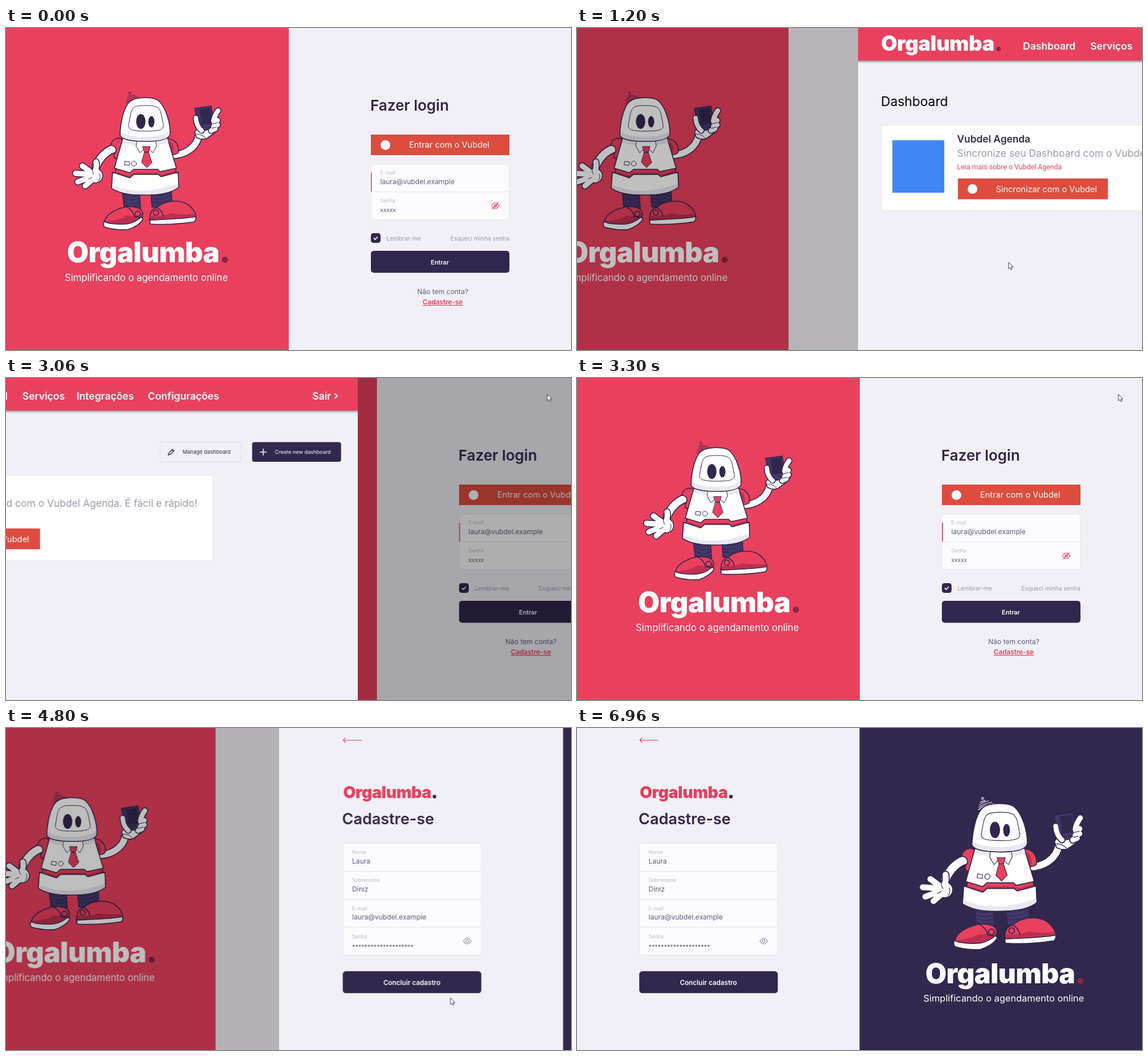
Recreate the animation shown at these times as an HTML page. Size 991 by 565 pixels, loop 7.32 s.

```html
<!DOCTYPE html>
<html lang="pt">
<head>
<meta charset="utf-8">
<title>Login</title>
<style>
  html, body { margin: 0; width: 100%; height: 100%; overflow: hidden; background: #f2f0f7; }
  svg { display: block; width: 100vw; height: 100vh; font-family: Inter, "Open Sans", sans-serif; }
  :root { --red: #e9405e; --ink: #32274d; --dot: #8c2443; }

  .red { fill: var(--red); }
  .ink { fill: var(--ink); }
  .page { fill: #f2f0f7; }
  .white { fill: #fff; }
  .sso { fill: #dc4d40; }
  .field { fill: #fcfbfd; stroke: #e6e4ed; }
  .rule { stroke: #e6e4ed; }
  .label { fill: #bdb8c9; font-size: 8.9px; }
  .value { fill: #645b7c; font-size: 12.1px; }
  .note { fill: #9d97ab; font-size: 10.35px; }
  .semi { font-weight: 600; }
  .mid { text-anchor: middle; }
  .nav { fill: #fff; font-size: 17.5px; font-weight: 600; }
  .icon { fill: none; stroke-width: 1.1; stroke-linecap: round; stroke-linejoin: round; }
  .brand { font-size: 49px; font-weight: 900; letter-spacing: -.6px; fill: currentColor; }

  .robot { stroke: var(--ink); stroke-width: 1.6; stroke-linejoin: round; stroke-linecap: round; }
  .robot .line { fill: none; }
  .robot .thin { stroke-width: 1; }
  .robot .flat { stroke: none; }
  .robot .shade { stroke: none; fill: #e9e7f0; }
  .robot .dark { stroke: none; fill: #bd2f50; }
  .robot .limb { fill: none; stroke: #fff; }
  .robot .edge { fill: none; }

  .login, .dash, .signup, .shade-over, .cursor { animation: 7320ms linear infinite; }
  .login { animation-name: login; }
  .dash { animation-name: dash; }
  .signup { animation-name: signup; }
  .shade-over { animation-name: dim; }
  .cursor { animation-name: cursor; }

  @keyframes login {
    0%, 100% { transform: none; }
    14.996% { transform: none; animation-timing-function: ease-out; }
    19.094%, 40.791% { transform: translateX(-248.75px); }
    40.792% { transform: translateX(248.75px); animation-timing-function: ease-out; }
    44.891% { transform: none; }
    64.131% { transform: none; animation-timing-function: ease-out; }
    68.23%, 99.999% { transform: translateX(-248.75px); }
  }
  @keyframes dim {
    0%, 100% { opacity: 0; }
    14.996% { opacity: 0; animation-timing-function: ease-out; }
    19.094% { opacity: .5; }
    40.792% { opacity: .5; animation-timing-function: ease-out; }
    44.891% { opacity: 0; }
    64.131% { opacity: 0; animation-timing-function: ease-out; }
    68.23%, 99.999% { opacity: .5; }
  }
  @keyframes dash {
    0% { transform: translateX(995px); }
    14.996% { transform: translateX(995px); animation-timing-function: ease-out; }
    19.094% { transform: none; }
    40.792% { transform: none; animation-timing-function: ease-out; }
    44.891%, 100% { transform: translateX(-995px); }
  }
  @keyframes signup {
    0% { transform: translateX(995px); }
    64.131% { transform: translateX(995px); animation-timing-function: ease-out; }
    68.23%, 100% { transform: none; }
  }
  @keyframes cursor {
    0%, 2.46% { transform: translate(1000px, 80px); }
    3.279% { transform: translate(985px, 87px); animation-timing-function: ease-in-out; }
    13.115%, 14.75% { transform: translate(753px, 411px); }
    15.574%, 19.672% { transform: translate(757px, 411px); animation-timing-function: ease-in; }
    25.41% { transform: translate(878px, 384px); }
    31.148% { transform: translate(930px, 190px); animation-timing-function: ease-out; }
    36.066% { transform: translate(952px, 45px); }
    36.885% { transform: translate(946px, 36px); }
    38.525%, 45.902% { transform: translate(949.5px, 28.5px); animation-timing-function: ease-in; }
    50.82% { transform: translate(937px, 216px); animation-timing-function: ease-out; }
    61.475% { transform: translate(773px, 473.5px); }
    63.934%, 66% { transform: translate(779.5px, 473.5px); animation-timing-function: ease-in-out; }
    70.492% { transform: translate(896.5px, 443.5px); }
    72.131% { transform: translate(901px, 437px); }
    76.23%, 82.787% { transform: translate(900.5px, 425px); }
    84.426%, 86.066% { transform: translate(900.5px, 418px); animation-timing-function: ease-in-out; }
    95.082%, 100% { transform: translate(1000px, 45px); }
  }
</style>
</head>
<body>
<svg viewBox="0 0 991 565">
  <defs>
    <linearGradient id="drop" x2="0" y2="1">
      <stop stop-opacity=".38"/>
      <stop offset="1" stop-opacity="0"/>
    </linearGradient>

    <g id="brand">
      <text x="-1" class="brand">Orgalumba</text>
      <circle cx="276" cy="-4.5" r="5.4" fill="var(--dot)"/>
    </g>

    <path id="armLeft" d="M195 210C178 213 164 227 158 243"/>
    <path id="armRight" d="M288 223C312 224 334 211 338 188"/>
    <path id="fingersLeft" d="M153 256L134 242M152 257L122 255M153 260L126 270M154 264L139 277M154 254Q160 248 158 235M156 258L162 263"/>
    <path id="thumbRight" d="M343 180Q334 172 333 158"/>
    <path id="fingersRight" d="M364 163Q366 153 372 145M365 166L371 162M364 173L371 170M360 180L367 177"/>
    <path id="shoeLeft" d="M173 340C175 327 190 319 209 314C225 312 240 316 240 326C239 334 222 343 210 344C195 345 178 343 173 340Z"/>
    <path id="shoeRight" d="M253 337C251 325 256 317 265 315C277 303 302 300 318 309C328 316 333 325 333 331C315 335 272 336 253 337Z"/>

    <g id="robot" class="robot">
      <g class="line thin" style="stroke: currentColor">
        <circle cx="217" cy="114" r="1.6"/>
        <path d="M213 120L221 117M212 124Q219 119 226 118M211 128Q219 122 231 120M210 132Q220 124 235 122"/>
      </g>

      <path d="M204 284L207 313Q220 321 236 316L234 286ZM254 286L256 314Q274 319 291 306L290 280Z" fill="#43386a"/>
      <path class="line thin" d="M204 292Q220 299 235 293M205 298Q220 305 235 299M206 304Q220 311 236 305M207 310Q220 317 236 311M254 293Q273 298 290 287M255 299Q273 304 290 293M256 305Q273 310 291 299"/>

      <path class="white" d="M172 339C170 345 171 349 175 350Q194 355 213 354C226 350 238 342 240 335L238 326Z"/>
      <path class="white" d="M252 335L253 344Q293 346 330 340Q334 337 333 330Z"/>
      <use href="#shoeLeft" class="red"/>
      <path class="dark" d="M174 339Q200 337 211 329Q226 332 239 324C239 334 222 342 210 343Q186 344 174 339Z"/>
      <use href="#shoeRight" class="red"/>
      <path class="dark" d="M254 330Q278 331 290 325Q312 329 332 326V330Q304 334 254 336Z"/>
      <path class="line" d="M212 314Q224 321 225 331L239 333M265 315Q274 320 276 330"/>
      <circle cx="231" cy="326" r="4.6" class="red"/>
      <circle cx="263" cy="324" r="4.6" class="red"/>

      <use href="#armLeft" class="edge" stroke-width="16"/>
      <use href="#armLeft" class="limb" stroke-width="12.8"/>
      <use href="#armRight" class="edge" stroke-width="14"/>
      <use href="#armRight" class="limb" stroke-width="10.8"/>

      <path class="red" d="M184 206C185 194 199 190 205 197C210 210 206 227 196 229C189 230 187 224 192 218C195 211 190 206 184 206Z"/>
      <path class="red" d="M283 194C297 195 305 206 302 219Q297 223 292 222Z"/>
      <path class="dark" d="M200 199Q206 213 195 226Q204 226 206 213ZM287 198Q297 207 294 220L289 215Z"/>

      <path class="red" d="M193 246L297 242L299 262L260 269H226L191 261Z"/>
      <path class="dark" d="M195 253L217 260L224 254H267L271 258L297 250V262H195Z"/>
      <path class="white" d="M187 253L217 263L224 257H267L272 261L302 253L303 279C292 289 270 293 245 293C220 294 198 290 185 281Z"/>
      <path class="shade" d="M186 275Q235 297 302 273V279Q283 292 245 292Q207 293 186 281Z"/>

      <path class="white" d="M205 193L190 246L217 254L224 248H266L270 252L299 246L283 193Z"/>
      <path class="shade" d="M207 194Q246 209 283 194L285 201Q246 213 205 201Z"/>
      <path class="white thin" d="M230 196L228 207L235 219L246 208L258 219L264 207L262 196Z"/>
      <path class="red thin" d="M240 208H253L250 218H243ZM243 218H250L256 236L247 245L238 236Z"/>
      <path class="line thin" d="M209 234L217 235L216 241L208 240Z"/>
      <circle class="line thin" cx="224.5" cy="238" r="4.3"/>

      <path class="white" d="M200 187C201 165 206 141 216 130C226 120 259 120 268 128C280 139 288 165 288 185C287 194 273 199 246 199C219 199 201 195 200 187Z"/>
      <path class="shade" d="M201 181Q211 191 246 191Q280 190 287 179V185Q284 198 246 198Q205 198 201 187Z"/>
      <path class="white thin" d="M219 149C222 138 227 136 245 136C264 136 269 139 272 150L276 170C277 178 271 181 245 181C220 181 214 178 215 170Z"/>
      <ellipse class="ink flat" cx="236.5" cy="164" rx="8.2" ry="13"/>
      <ellipse class="ink flat" cx="255" cy="164.5" rx="5.4" ry="10"/>

      <use href="#fingersLeft" class="edge" stroke-width="12.5"/>
      <circle cx="157" cy="259" r="12.5" class="white"/>
      <use href="#fingersLeft" class="limb" stroke-width="9.3"/>
      <circle cx="157" cy="259" r="11.5" class="white flat"/>
      <path class="line thin" d="M152 244Q150 252 154 257M145 265L151 262M164 256Q167 263 162 268"/>

      <path class="white" d="M331 182L334 192Q343 197 352 194L366 184L360 168L340 172Z"/>
      <use href="#fingersRight" class="edge" stroke-width="11.5"/>
      <path d="M331 141L360 137L366 177L339 181Z" fill="#43386a"/>
      <path class="ink flat" d="M339 143L358 140L362 167L343 170Z"/>
      <path class="line thin" d="M344 175L350 174M353 174L360 173"/>
      <use href="#thumbRight" class="edge" stroke-width="11"/>
      <use href="#thumbRight" class="limb" stroke-width="7.8"/>
      <use href="#fingersRight" class="limb" stroke-width="8.3"/>
      <path class="line thin" d="M362 168L371 166M361 176L369 174M334 186Q344 186 351 194"/>
    </g>
  </defs>

  <g class="login">
    <rect x="-2" width="995" height="565" class="page"/>
    <rect x="-2" width="498" height="565" class="red"/>
    <use href="#robot" color="#32274d"/>
    <use href="#brand" transform="translate(108 411)" color="#fff"/>
    <text x="103" y="444" class="white" font-size="16.65">Simplificando o agendamento online</text>

    <text x="639" y="145" class="ink semi" font-size="26">Fazer login</text>
    <rect x="640" y="187" width="243" height="36" class="sso"/>
    <circle cx="665.5" cy="205.5" r="8.5" class="white"/>
    <text x="707" y="210" class="white" font-size="14.6">Entrar com o Vubdel</text>

    <rect x="640.5" y="238.5" width="242.5" height="98" rx="6" class="field"/>
    <path class="rule" d="M641 287.5H883"/>
    <rect x="640" y="254" width="1.6" height="33" class="red"/>
    <text x="656.5" y="257" class="label">E-mail</text>
    <text x="656.5" y="274" class="value">laura@vubdel.example</text>
    <text x="656.5" y="306" class="label">Senha</text>
    <text x="656.5" y="323" class="value" style="font-size: 10px">xxxxx</text>
    <g class="icon" stroke="#e9405e">
      <path d="M851.5 312Q858 302 865 312Q858 322 851.5 312ZM853 317.5L863.5 306.5"/>
      <circle cx="858.2" cy="312" r="2.2"/>
    </g>

    <rect x="640" y="360" width="17" height="17" rx="4.5" class="ink"/>
    <path class="icon" style="stroke-width: 1.7" stroke="#fff" d="M645.5 369L647.7 371L651.5 366.8"/>
    <text x="667.5" y="372.5" class="note">Lembrar-me</text>
    <text x="883" y="372.5" class="note" text-anchor="end">Esqueci minha senha</text>
    <rect x="640" y="391" width="243" height="38.5" rx="5" class="ink"/>
    <text x="761" y="414.5" class="white semi mid" font-size="10.9">Entrar</text>
    <text x="766" y="467" class="value mid">Não tem conta?</text>
    <text x="766" y="485" class="red semi mid" font-size="11.8" text-decoration="underline">Cadastre-se</text>
  </g>
  <rect class="shade-over" x="-2" width="995" height="565"/>

  <g class="dash">
    <rect x="-2" width="995" height="565" class="page"/>
    <rect x="-2" y="57" width="995" height="5" fill="url(#drop)"/>
    <rect x="-2" width="995" height="57" class="red"/>
    <use href="#brand" transform="translate(39 40) scale(.743)" color="#fff"/>
    <g class="nav">
      <text x="287" y="37.5">Dashboard</text>
      <text x="405" y="37.5">Serviços</text>
      <text x="500" y="37.5">Integrações</text>
      <text x="625" y="37.5">Configurações</text>
      <text x="913.5" y="37.5">Sair</text>
    </g>
    <path class="icon" style="stroke-width: 2" stroke="#fff" d="M953 27.5L957.5 31.5L953 35.5"/>

    <text x="38" y="137" font-size="22.8">Dashboard</text>
    <rect x="646.5" y="112.5" width="141" height="34.5" rx="4" fill="none" stroke="#dedbe8"/>
    <path class="icon" style="stroke-width: 1.4" stroke="#32274d" d="M661 135L662 131.5L668.5 125L671 127.5L664.5 134ZM667 126.5L669.5 129"/>
    <text x="686" y="133" class="ink" font-size="9.2">Manage dashboard</text>
    <rect x="808" y="112.5" width="156" height="34.5" rx="4" class="ink"/>
    <path class="icon" style="stroke-width: 1.6" stroke="#fff" d="M822 130H833M827.5 124.5V135.5"/>
    <text x="848" y="133" class="white" font-size="9.15">Create new dashboard</text>

    <rect x="39" y="170.5" width="700" height="150" fill="#fff" stroke="#e4e3ea"/>
    <rect x="58" y="197" width="91" height="92" fill="#4285f4"/>
    <text x="171.5" y="201" class="ink semi" font-size="17.3">Vubdel Agenda</text>
    <text x="171.5" y="225.5" fill="#9a97a5" font-size="17.45">Sincronize seu Dashboard com o Vubdel Agenda. É fácil e rápido!</text>
    <text x="171.5" y="248" class="red" font-size="12.4" font-family="Roboto, sans-serif">Leia mais sobre o Vubdel Agenda</text>
    <rect x="173" y="264" width="263" height="36.5" class="sso"/>
    <circle cx="198.5" cy="282.5" r="8.5" class="white"/>
    <text x="239.5" y="288" class="white" font-size="14.6">Sincronizar com o Vubdel</text>
  </g>

  <g class="signup">
    <rect x="-2" width="995" height="565" class="page"/>
    <rect x="495.6" width="498" height="565" class="ink"/>
    <path class="icon" stroke="#e9405e" d="M142.5 21.5H110M114 17.5L110 21.5L114 25.5"/>
    <use href="#brand" transform="translate(110.5 123) scale(.578)" color="#e9405e" style="--dot: #32274d"/>
    <text x="108" y="169" class="ink semi" font-size="27">Cadastre-se</text>

    <rect x="109.5" y="202.5" width="242.5" height="196" rx="6" class="field"/>
    <path class="rule" d="M110 251.5H352M110 300.5H352M110 349.5H352"/>
    <g class="label">
      <text x="125.5" y="221">Nome</text>
      <text x="125.5" y="270">Sobrenome</text>
      <text x="125.5" y="319.5">E-mail</text>
      <text x="125.5" y="368.5">Senha</text>
    </g>
    <g class="value">
      <text x="125.5" y="238">Laura</text>
      <text x="125.5" y="287">Diniz</text>
      <text x="125.5" y="336">laura@vubdel.example</text>
      <text x="125.5" y="387.5" font-weight="600" style="font-size: 10px">********************</text>
    </g>
    <g class="icon" stroke="#8d869c">
      <path d="M320.8 374Q327.5 364 334.2 374Q327.5 384 320.8 374Z"/>
      <circle cx="327.5" cy="374" r="2.2"/>
    </g>
    <rect x="109.2" y="426.7" width="243" height="38.6" rx="5.5" class="ink"/>
    <text x="230.5" y="451" class="white semi mid" font-size="11.7">Concluir cadastro</text>

    <use href="#robot" transform="translate(471.7 -2.4) scale(1.105)" color="#fff"/>
    <use href="#brand" transform="translate(612 448) scale(.982)" color="#fff"/>
    <text x="607.5" y="480" class="white" font-size="16.4">Simplificando o agendamento online</text>
  </g>

  <path class="cursor" d="M0 0V11.5L2.6 9.2L4.4 13L6.3 12.2L4.6 8.4H8Z" fill="#fff" stroke="#26232e" stroke-width=".9"/>
</svg>
</body>
</html>
```
